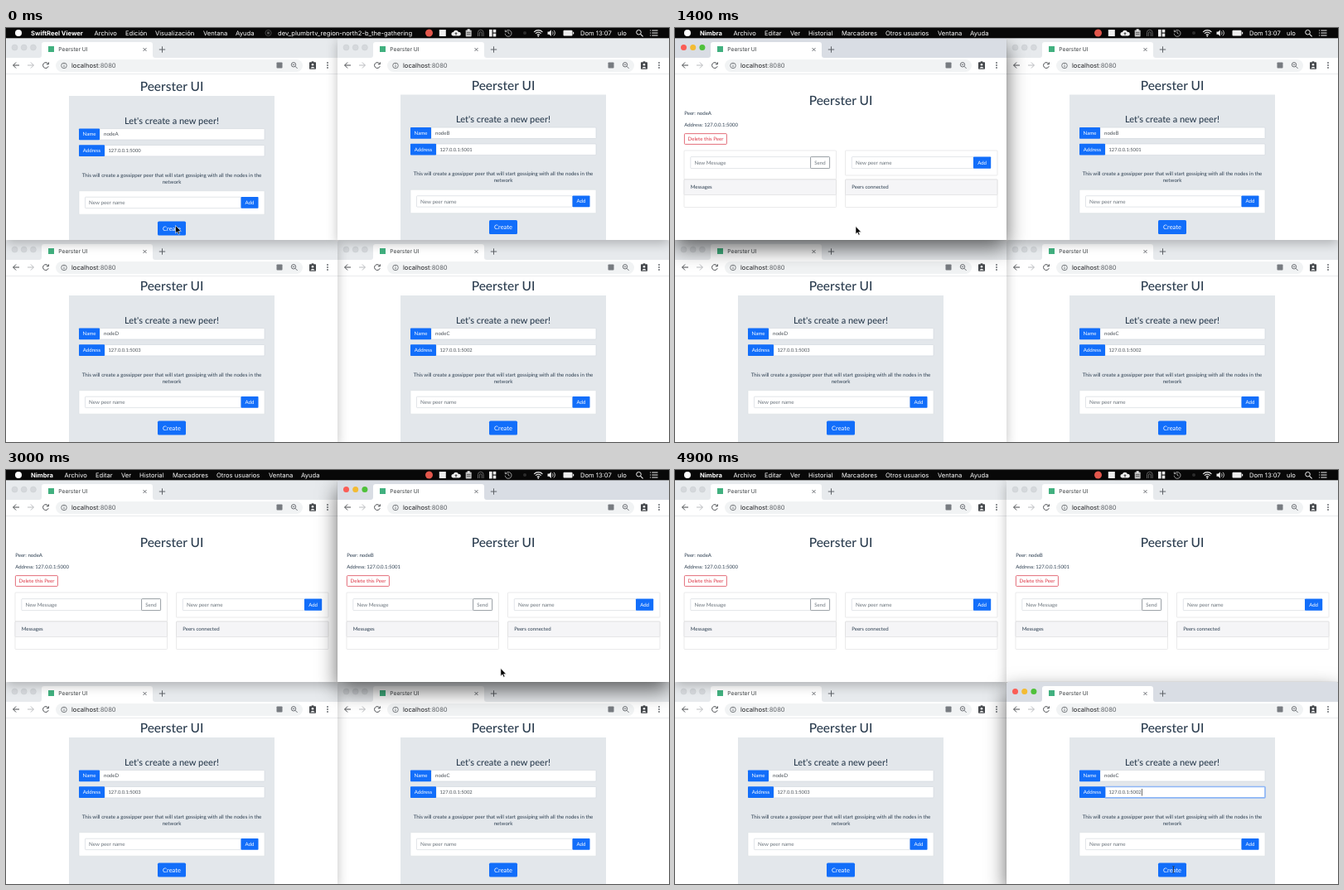
An HTML page for the animation above (5000 ms loop, 800 by 500 pixels).

```html
<!DOCTYPE html>
<html lang="es">
<head>
<meta charset="utf-8">
<title>Peerster UI</title>
<style>
html, body { margin: 0; width: 100%; height: 100%; overflow: hidden; background: #fff; }
svg { display: block; position: absolute; left: 0; top: 0; }
text { font-family: Lato, sans-serif; text-rendering: geometricPrecision; white-space: pre; }
.ui { font-family: Inter, sans-serif; }
.win { position: absolute; width: 400px; height: 244px; overflow: hidden; background: #fff;
  border-radius: 3px 3px 0 0; box-shadow: 0 4px 14px rgba(0,0,0,.25); }
.win.on { z-index: 5 !important; box-shadow: 0 0 1px rgba(0,0,0,.4), 0 10px 24px rgba(0,0,0,.6); }
.strip { fill: #e7eaed; }
.on .strip { fill: #d9dde4; }
.lights circle { fill: #d5d8dc; stroke: #c6c9cd; stroke-width: .4; }
.on .lights circle { fill: var(--c); stroke: none; }
.peer, .done .form, .ring, .bar, .caret { display: none; }
.done .peer, .focus .ring, .edit .bar, .blink .caret { display: inline; }
.hover .create { fill: #155fd8; stroke: #2b5cab; }
#menu { z-index: 9; }
#cursor { z-index: 10; }
</style>
</head>
<body>
<script>
const BLUE = '#126efa', INK = '#2c3e50', GREY = '#6c757d', EDGE = '#ced4da', ICON = '#5f6368';

const rect = (x, y, w, h, fill, more = '') =>
  `<rect x="${x}" y="${y}" width="${w}" height="${h}" fill="${fill}" ${more}/>`;
const text = (x, y, size, str, fill = INK, more = '') =>
  `<text x="${x}" y="${y}" font-size="${size}" fill="${fill}" ${more}>${str}</text>`;
const mid = (x, y, size, str, fill, more = '') =>
  text(x, y, size, str, fill, 'text-anchor="middle" ' + more);
const path = (d, stroke, width = 1, more = '') =>
  `<path d="${d}" fill="none" stroke="${stroke}" stroke-width="${width}" ${more}/>`;
const dot = (x, y, r, fill, more = '') => `<circle cx="${x}" cy="${y}" r="${r}" fill="${fill}" ${more}/>`;
const box = (x, y, w, h, stroke = EDGE, fill = '#fff') =>
  rect(x, y, w, h, fill, `stroke="${stroke}" stroke-width=".6" rx=".8"`);
const button = (x, y, w, h, label) =>
  rect(x, y, w, h, BLUE, 'rx=".8"') + mid(x + w / 2, y + h / 2 + 2, 6.1, label, '#fff');
const svg = (id, w, h, body) => `<svg id="${id}" width="${w}" height="${h}">${body}</svg>`;

function toolbar() {
  const lights = ['#fb5d56', '#f3bb33', '#4fc13b']
    .map((c, i) => dot(10.5 + 11.2 * i, 11.5, 3.5, '', `style="--c:${c}"`)).join('');
  return rect(0, 0, 400, 24, '', 'class="strip"') + `<g class="lights">${lights}</g>` +
    '<path d="M40 24q3 0 3-3V8q0-3 3-3h128q3 0 3 3v13q0 3 3 3z" fill="#fff"/>' +
    rect(51, 10, 7, 7, '#41b07f') +
    text(63.3, 16, 6.7, 'Peerster UI', '#3c4043', 'class="ui"') +
    path('M165.5 12l4 4m0-4l-4 4', ICON, .9) + path('M188.5 10.3v7.4m-3.7-3.7h7.4', ICON) +
    rect(0, 24, 400, 19.5, '#fff') +
    path('M16 33H8.7m3.4-3.5L8.6 33l3.5 3.5', '#4a4d51') +
    path('M26 33h7.3m-3.4-3.5l3.5 3.5-3.5 3.5', '#b9bbbe') +
    path('M50.7 31A3.4 3.4 0 1 0 51.2 34.2M51.4 29.4v2.4h-2.5', '#4a4d51') +
    rect(60, 26, 298, 15, '#f1f3f4', 'rx="7.5"') +
    `<g class="bar">${rect(60, 26, 298, 15, '#fff', 'rx="7.5" stroke="#86b0ee" stroke-width="1.2"')}${rect(78.5, 28.5, 55, 10, '#a9cef8')}</g>` +
    dot(70, 33.4, 3.3, 'none', `stroke="${ICON}" stroke-width=".8"`) +
    path('M70 33v2.2m0-4.1v.9', ICON, .9) +
    text(79, 36.2, 7.6, 'localhost<tspan fill="#5f6368">:8080</tspan>', '#202124', 'class="ui"') +
    rect(326.5, 29.5, 7, 7, '#777b80', 'rx=".8"') +
    dot(347, 32.3, 2.7, 'none', `stroke="${ICON}" stroke-width=".9"`) +
    path('M349 34.3l2.6 2.6M345.7 32.3h2.6', ICON, .9) +
    rect(366, 29.3, 8, 8.5, '#45484c', 'rx=".8"') + dot(370, 32.3, 1.3, '#fff') +
    '<path d="M367.4 36.4q2.6-3.4 5.2 0z" fill="#fff"/>' + rect(368.7, 28.3, 2.6, 1.5, '#45484c') +
    [30, 33, 36].map(y => dot(388, y, .9, ICON)).join('') +
    rect(0, 43, 400, .6, '#dcdee1');
}

function form(node, addr, shift) {
  return `<g class="form" transform="translate(0 ${shift})">` +
    mid(200, 64, 15.5, 'Peerster UI', INK, 'font-weight="500"') +
    rect(76, 70, 248, 190, '#e3e7eb') +
    mid(200, 103.8, 11, "Let's create a new peer!", INK, 'font-weight="500"') +
    box(113, 109.6, 199, 13.4) + button(88, 109.4, 25, 13.8, 'Name') +
    text(118, 118.2, 6.1, node, '#495057') +
    box(119, 129.5, 193, 13.4) +
    rect(119, 129.5, 193, 13.4, '#fff', 'class="ring" rx=".8" stroke="#8db6f6" stroke-width="1.7"') +
    button(88, 129.3, 31, 13.8, 'Address') +
    text(123.5, 138.3, 5.8, addr, '#495057') +
    rect(163, 132, .6, 8.5, '#111', 'class="caret"') +
    mid(200, 167.7, 6.2, 'This will create a gossipper peer that will start gossiping with all the nodes in the') +
    mid(200, 175.7, 6.2, 'network') +
    box(88, 184.7, 224, 28.5, '#d9dde1') + box(95.5, 192.2, 188, 13.4) +
    text(100, 201, 6.3, 'New peer name', GREY) + button(283.5, 192, 21, 13.8, 'Add') +
    rect(183, 221.6, 34, 17, BLUE, 'class="create" rx="1.6"') +
    mid(200, 232.5, 7.5, 'Create', '#fff') + '</g>';
}

function peer(node, addr) {
  const list = (x, label) => box(x, 171, 183.5, 33.5, '#dcdcdd') +
    box(x, 171, 183.5, 18.5, '#d8d8da', '#f5f5f7') + text(x + 7.7, 182.4, 6.1, label);
  return '<g class="peer">' +
    mid(200, 80.5, 15.5, 'Peerster UI', INK, 'font-weight="500"') +
    text(11.2, 92.6, 6.1, 'Peer: ' + node) + text(11.2, 107.2, 6, 'Address: ' + addr) +
    rect(11.4, 115.6, 51, 12.8, '#fff', 'stroke="#dc4a58" stroke-width=".8" rx="1"') +
    mid(37, 124, 6.1, 'Delete this Peer', '#dc3545') +
    box(11, 136, 183.5, 35, '#dcdcdd') + box(18.8, 143.6, 145, 14) +
    text(23.5, 152.6, 6.2, 'New Message', GREY) +
    rect(163.6, 143.6, 23, 14, '#fff', `stroke="${GREY}" stroke-width=".7" rx=".8"`) +
    mid(175, 152.6, 6.1, 'Send', GREY) + list(11, 'Messages') +
    box(205.5, 136, 183.5, 30, '#dcdcdd') + box(213.3, 143.6, 147, 14) +
    text(218, 152.6, 6.3, 'New peer name', GREY) + button(360, 143.4, 21.2, 14.4, 'Add') +
    list(205.5, 'Peers connected') + '</g>';
}

function menu() {
  const item = (x, str, weight = 400) => text(x, 9, 7.6, str, '#fff', `class="ui" font-weight="${weight}"`);
  const items = (app, list) => item(30, app, 700) + list.map(([x, s]) => item(x, s)).join('');
  const W = '#eee';
  return rect(0, 0, 800, 12.3, '#080808') + dot(15, 6, 4, '#fff') +
    '<g id="before">' + items('SwiftReel Viewer', [[106.5, 'Archivo'], [144, 'Edición'], [180, 'Visualización'],
      [238, 'Ventana'], [277, 'Ayuda'], [328, 'dev_plumbrtv_region-north2-b_the-gathering']]) +
    dot(316.5, 6, 3.6, 'none', 'stroke="#555" stroke-width=".8"') + rect(315, 4.5, 3, 3, '#555') + '</g>' +
    '<g id="after">' + items('Nimbra', [[70.5, 'Archivo'], [108, 'Editar'], [139, 'Ver'], [161, 'Historial'],
      [201, 'Marcadores'], [254, 'Otros usuarios'], [317, 'Ventana'], [356, 'Ayuda']]) + '</g>' +
    dot(510.5, 6, 4.5, '#e2574c') + rect(522.8, 2, 8, 8, W) +
    `<path d="M539.5 9.5a2.3 2.3 0 0 1 .3-4.6 3.3 3.3 0 0 1 6.2 0 2.3 2.3 0 0 1 1 4.6z" fill="${W}"/>` +
    path('M543 8.7V5.8m-1.3 1.2l1.3-1.3 1.3 1.3', '#111', .8) +
    rect(554.7, 2.5, 7, 8, '#bbb', 'rx=".8"') + rect(556.7, 1.3, 3, 2, W) + path('M556 5.5h4.4m-4.4 2h4.4', '#333', .6) +
    path('M569.5 10V5.5a3.3 3.3 0 0 1 6.6 0V10M571.4 10V6a1.4 1.4 0 0 1 2.8 0v4', '#777', .8) +
    rect(583, 1.8, 3.6, 8.6, W) + rect(587.7, 1.8, 3.6, 3.7, W) + rect(587.7, 6.6, 3.6, 3.8, W) +
    path('M602.8 4.3a3.9 3.9 0 1 1-.6 2.4M602.3 2.3v2.3h2.2M606 3.7v2.5l1.7 1', '#bbb', .8) +
    dot(626, 6, 2, '#2c2c2c') +
    path('M637.2 4.8a7 7 0 0 1 10.2 0M639 6.6a4.6 4.6 0 0 1 6.6 0M640.8 8.4a2.2 2.2 0 0 1 3 0', W, 1.2) + dot(642.3, 9.7, .9, W) +
    `<path d="M653.5 4.5h2l2.3-2.2v7.6l-2.3-2.2h-2z" fill="${W}"/>` +
    path('M659.3 4.3a2.5 2.5 0 0 1 0 3.6M661 2.8a4.6 4.6 0 0 1 0 6.6', W, .8) +
    rect(672.5, 2.8, 11, 6.6, W, 'rx="1"') + rect(684, 4.8, 1.2, 2.6, W) +
    item(693, 'Dom 13:07') + item(738, 'ulo') +
    dot(763.5, 5.2, 2.8, 'none', `stroke="${W}"`) + path('M765.6 7.3l3 3', W, 1.2) +
    path('M777 3h1m1.3 0h7.2M777 6h1m1.3 0h7.2M777 9h1m1.3 0h7.2', W, 1);
}

const pointers =
  '<path id="arrow" d="M0 0v9.4l2.1-2 1.5 3.3 1.5-.7-1.4-3.1h3z" fill="#000" stroke="#fff" stroke-width=".6"/>' +
  '<path id="hand" d="M2.2 5.2V1q.8-1 1.5 0v3q2.7 0 4 1.2v2q-.3 1.5-1 3.2H3Q2 8.6 .5 6.6q.2-1.3 1.7-.2z" fill="#fff" stroke="#000" stroke-width=".7"/>' +
  '<path id="beam" d="M-1.3 -4q1.3 0 1.3 1v6q0 1 -1.3 1M1.3 -4q-1.3 0 -1.3 1v6q0 1 1.3 1" fill="none" stroke="#333" stroke-width=".7"/>';

// name, x, y, port, content shift, resting stack order
const nodes = [['A', 0, 12, 5000, 0, 3], ['B', 400, 12, 5001, -1.5, 4],
  ['C', 400, 256, 5002, -3, 1], ['D', 0, 256, 5003, -3, 2]];
document.body.innerHTML = nodes.map(([n, x, y, port, shift, z]) => {
  const addr = '127.0.0.1:' + port, node = 'node' + n;
  return `<div class="win" id="${n}" style="left:${x}px;top:${y}px;z-index:${z}">` +
    svg('view' + n, 400, 244, form(node, addr, shift) + peer(node, addr) + toolbar()) + '</div>';
}).join('') + svg('menu', 800, 13, menu()) + svg('cursor', 800, 500, `<g id="pointer">${pointers}</g>`);

const $ = id => document.getElementById(id);
const show = (id, on) => { $(id).style.display = on ? 'inline' : 'none'; };

// window: activated, created, deactivated
const events = { A: [300, 1100, 2300], B: [2300, 3000, 3900], C: [3900, 9e9, 9e9] };
const track = [[0, 204.5, 238.5], [300, 204.5, 238.5], [700, 207, 240], [1100, 207, 240],
  [1400, 218, 239.5], [1500, 245, 238], [1700, 530, 232], [1800, 605, 236], [2100, 589.5, 234],
  [2600, 596.5, 239.5], [3100, 597, 239.5], [3600, 601.5, 482.5], [5000, 601.5, 482.5]];

function place(t) {
  const i = track.findIndex(k => k[0] > t);
  const [a, x, y] = track[i - 1], [b, u, v] = track[i], p = (t - a) / (b - a);
  return [x + (u - x) * p, y + (v - y) * p];
}

function render(t) {
  let hand = false;
  for (const n in events) {
    const [start, made, end] = events[n], list = $(n).classList;
    const on = t >= start && t < end, editing = on && t < made, typing = editing && n !== 'A';
    const hover = editing && n !== 'C';
    hand = hand || hover;
    list.toggle('on', on);
    list.toggle('done', t >= made);
    list.toggle('edit', editing && n === 'A');
    list.toggle('focus', typing);
    list.toggle('blink', typing && (t - start) % 1000 < 500);
    list.toggle('hover', hover);
  }
  const beam = t >= events.C[0];
  show('before', t < 300);
  show('after', t >= 300);
  show('hand', hand);
  show('beam', beam);
  show('arrow', !hand && !beam);
  $('pointer').setAttribute('transform', `translate(${place(t)})`);
}

function frame() {
  render(Math.floor(performance.now() % 5000 / 100) * 100);
  requestAnimationFrame(frame);
}
frame();
</script>
</body>
</html>
```
